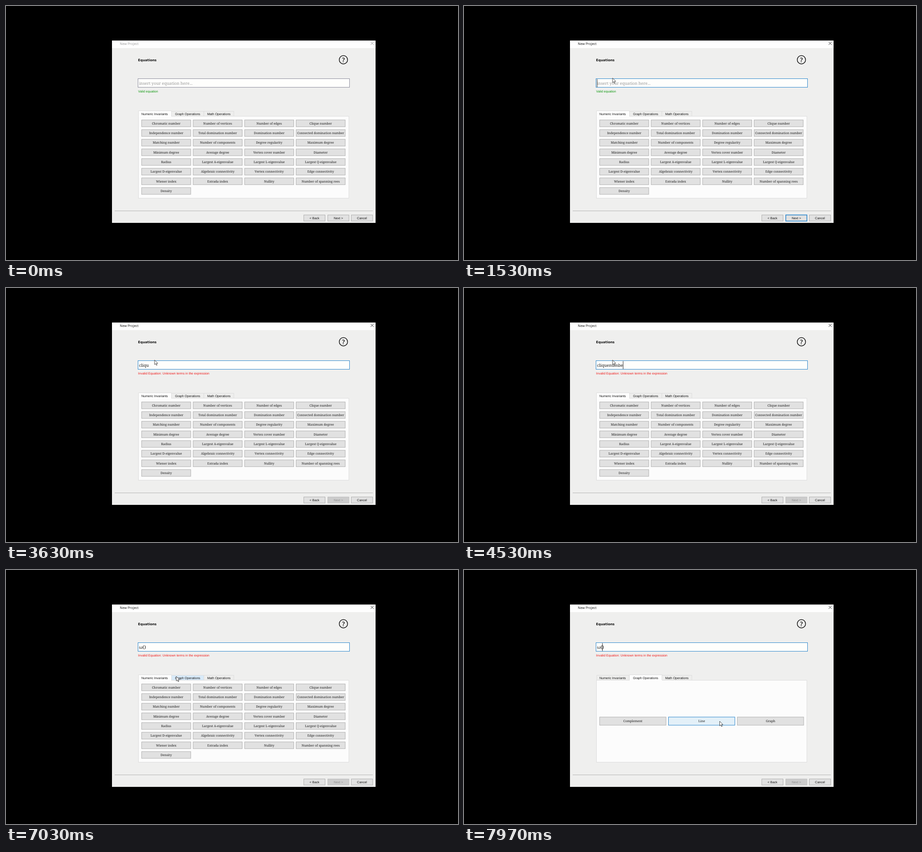
These frames come from a looping animation (998 by 561 pixels, 8000 ms). An HTML page:

```html
<!DOCTYPE html>
<html lang="en">
<head>
<meta charset="utf-8">
<title>Equation dialog</title>
<style>
html, body { margin: 0; width: 100%; height: 100%; overflow: hidden; background: #000; }
svg { display: block; width: 100%; height: 100%; }
text { font: 7px "Liberation Sans", Arial, sans-serif; fill: #111; text-rendering: geometricPrecision; white-space: pre; }
.serif { font: 6.95px "Noto Serif", serif; text-anchor: middle; fill: #1c1c1c; }
.input { font: 9.15px "Noto Serif", serif; }
.mid { text-anchor: middle; }
</style>
</head>
<body>
<svg id="stage" viewBox="0 0 998 561"></svg>
<script>
const LOOP = 8000, BLINK = 530;
const BLUE = '#2b86cc', FACE = '#e1e1e1', EDGE = '#b0b0b0';
const stage = document.getElementById('stage');

function add(tag, attrs, parent = stage) {
  const el = document.createElementNS('http://www.w3.org/2000/svg', tag);
  set(el, attrs);
  return parent.appendChild(el);
}
function set(el, attrs) {
  for (const key in attrs) el.setAttribute(key, attrs[key]);
}
function show(el, on) { el.style.display = on ? '' : 'none'; }

function box(x, y, w, h, fill, stroke = 'none', parent = stage) {
  return add('rect', { x, y, width: w, height: h, fill, stroke }, parent);
}
function label(str, x, y, cls = '', parent = stage) {
  const el = add('text', { x, y, class: cls }, parent);
  el.textContent = str;
  return el;
}
function button(str, x, y, w, h, cls, parent = stage) {
  const face = box(x, y, w, h, FACE, EDGE, parent);
  const text = label(str, x + w / 2, y + h / 2 + 2.6, cls, parent);
  return { face, text };
}

// Window
box(234, 76.5, 582, 402.5, '#efefee');
box(234, 76.5, 582, 16.5, '#fefefe');
const title = label('New Project', 251.3, 85.5);
title.style.font = '7.45px "Open Sans", sans-serif';
const close = add('path', { d: 'M805.3 79.3l6.4 6.4m0-6.4l-6.4 6.4', 'stroke-width': 0.9 });
label('Equations', 291.6, 122).style.font = 'bold 7.3px "DejaVu Sans", sans-serif';
add('circle', { cx: 745, cy: 118.7, r: 9.2, fill: 'none', stroke: '#111', 'stroke-width': 1.5 });
label('?', 745, 123.6, 'mid').style.font = '600 13.5px "Open Sans", sans-serif';

// Equation field
const field = box(291.5, 160.5, 467, 19, '#fefefc');
const entry = label('', 293.7, 174, 'input');
const caret = add('path', { stroke: '#111', 'stroke-width': 0.9 });
const status = label('', 291.8, 190.8);

// Pane and tabs
box(292.5, 243.5, 464.5, 181, '#fcfcfc', '#dcdcdc');
const tabs = [
  ['Numeric Invariants', 293, 364.5, 328.2],
  ['Graph Operations', 365.5, 437, 401],
  ['Math Operations', 437, 503, 470]
].map(([name, left, right, mid]) => {
  const face = add('path', { stroke: '#dcdcdc' });
  label(name, mid, 240.8, 'mid');
  return { face, left, right };
});
function styleTab({ face, left, right }, selected, hover) {
  const l = selected ? left - 0.5 : left, r = selected ? right + 1 : right;
  set(face, {
    d: `M${l} ${selected ? 244.2 : 243}V${selected ? 231.5 : 232.5}H${r}V${selected ? 244.2 : 243}`,
    fill: selected ? '#fdfdfd' : hover ? '#d8eaf9' : '#eeeeed'
  });
}

const numeric = add('g', {});
('Chromatic number,Number of vertices,Number of edges,Clique number,' +
 'Independence number,Total domination number,Domination number,Connected domination number,' +
 'Matching number,Number of components,Degree regularity,Maximum degree,' +
 'Minimum degree,Average degree,Vertex cover number,Diameter,' +
 'Radius,Largest A-eigenvalue,Largest L-eigenvalue,Largest Q-eigenvalue,' +
 'Largest D-eigenvalue,Algebraic connectivity,Vertex connectivity,Edge connectivity,' +
 'Wiener index,Estrada index,Nullity,Number of spanning rees,Density').split(',')
  .forEach((name, i) =>
    button(name, 299.5 + i % 4 * 113.7, 251.7 + Math.floor(i / 4) * 21.33, 108.4, 15, 'serif', numeric));

const graph = add('g', {});
const ops = ['Complement', 'Line', 'Graph'].map((name, i) =>
  button(name, 299.5 + i * 152, 324.8, 146.5, 18, 'serif', graph));

// Footer
add('path', { d: 'M240 452.5H810', stroke: '#b4b4b4' });
button('< Back', 657.5, 461.5, 47, 13.5, 'mid');
const next = button('Next >', 710.5, 461.5, 46.7, 13.5, 'mid');
button('Cancel', 762.5, 461.5, 47, 13.5, 'mid');

const pointer = add('path', {
  d: 'M0 0V10.2L2.4 8L4.1 11.8L5.7 11.1L4 7.4H7.2Z',
  fill: '#fff', stroke: '#222', 'stroke-width': 0.8, 'stroke-linejoin': 'round'
});

// Each key: time, text after it, caret index
const CLICK = 410, TAB_CLICK = 7050;
const keys = [[CLICK, '', 0]];
[1930, 2430, 2510, 2580, 3100, 3680, 3820, 3960, 4100, 4320, 4480].forEach((t, i) => {
  const str = 'cliquenumbe'.slice(0, i + 1);
  keys.push([t, str, str.length]);
});
keys.push([4700, 'ω', 1], [5770, 'ω(', 2], [5940, 'ω()', 3], [6471, 'ω()', 2]);

// Pointer moves: start, end, from, to
const moves = [
  [30, 430, [440, 250], [328, 159]],
  [6450, 6980, [328, 159], [376, 235]],
  [7230, 7960, [376, 235], [564.5, 334]]
];

const ramp = (t, a, b) => Math.min(1, Math.max(0, (t - a) / (b - a)));
const smooth = p => p * p * (3 - 2 * p);
const mix = (a, b, p) => 'rgb(' + a.map((v, i) => Math.round(v + (b[i] - v) * p)) + ')';

function pointerAt(t) {
  const [a, b, from, to] = moves.filter(m => t >= m[0]).pop() || moves[0];
  const p = smooth(ramp(t, a, b));
  return from.map((v, i) => v + (to[i] - v) * p);
}

function drawEntry(t) {
  const key = keys.filter(k => t >= k[0]).pop();
  const str = key ? key[1] : '';
  entry.textContent = str || 'insert your equation here...';
  entry.style.fill = str ? '#1c1c1c' : '#999';
  entry.style.fontSize = str[0] === 'ω' ? '10.4px' : '';
  show(caret, key && Math.floor((t - key[0]) / BLINK) % 2 === 0);
  if (key) {
    const width = key[2] ? entry.getSubStringLength(0, key[2]) : 0;
    set(caret, { d: `M${294 + width} 161.5V179` });
  }
  status.textContent = str ? 'Invalid Equation: Unknown terms in the expression' : 'Valid equation';
  status.style.fill = str ? '#f01818' : '#0a960a';
}

function draw(t) {
  const active = t >= CLICK;
  title.style.fill = active ? '#111' : '#999';
  set(close, { stroke: active ? '#111' : '#888' });
  set(field, { stroke: active ? BLUE : '#8c8c9c' });
  drawEntry(t);

  // The default button greys out, then loses its blue edge
  const grey = ramp(t, 1930, 2200), fade = ramp(t, 2630, 2800);
  next.text.style.fill = mix([17, 17, 17], [140, 140, 140], grey);
  set(next.face, {
    fill: mix([225, 225, 225], [204, 204, 204], fade),
    stroke: active ? mix([43, 134, 204], [191, 191, 191], fade) : EDGE,
    'stroke-width': active ? 1.6 - 0.6 * fade : 1
  });

  const [x, y] = pointerAt(t);
  set(pointer, { transform: `translate(${x} ${y})` });
  show(pointer, t >= 30);

  const page = t >= TAB_CLICK ? 1 : 0;
  tabs.forEach((tab, i) => styleTab(tab, i === page,
    x > tab.left && x < tab.right && y > 232 && y < 243));
  show(numeric, !page);
  show(graph, page);
  ops.forEach(({ face }, i) => {
    const left = 299.5 + i * 152;
    const hover = x > left && x < left + 146.5 && y > 324.8 && y < 342.8;
    set(face, { fill: hover ? '#e3f0f8' : FACE, stroke: hover ? BLUE : EDGE });
  });
}

const start = performance.now();
function tick() {
  draw((performance.now() - start) % LOOP);
  requestAnimationFrame(tick);
}
tick();
</script>
</body>
</html>
```
